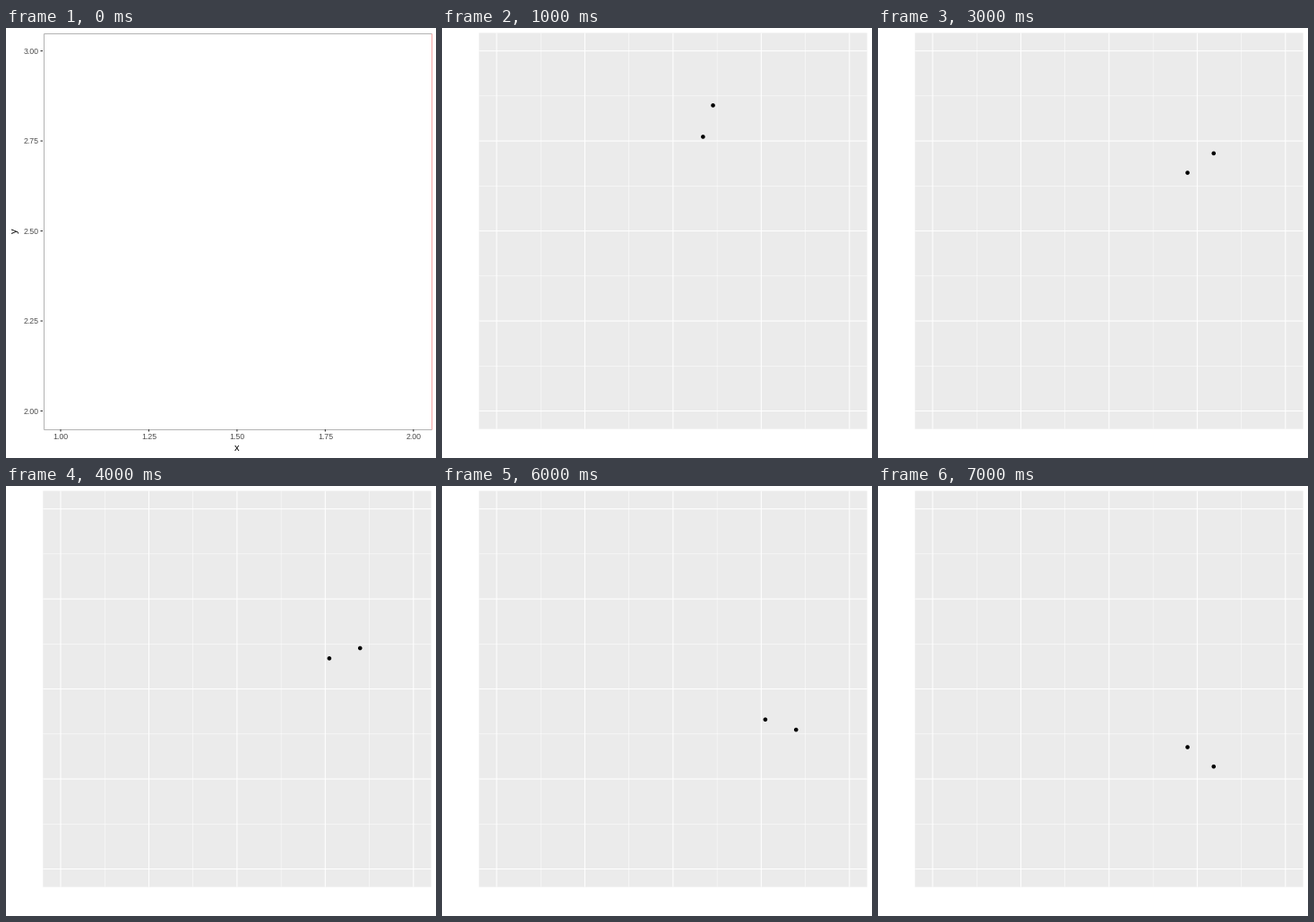
Animation, 480 px wide and 480 px high, one loop 8000 ms. Source, as a matplotlib script:

```python
import numpy as np
import matplotlib.pyplot as plt
from matplotlib.animation import FuncAnimation
from matplotlib.patches import Circle, Rectangle

SIZE, DPI = 480, 72          # at 72 dpi one point equals one pixel
FRAMES, INTERVAL = 8, 1000
LEFT, RIGHT, TOP, BOTTOM = 41.3, 474.5, 5.5, 447.6
CENTER = (1.5, 2.5)
RADII = (0.275, 0.3667)
STEP = np.pi / 10            # clockwise turn per frame
FONT = "Liberation Sans"

fig = plt.figure(figsize=(SIZE / DPI, SIZE / DPI), dpi=DPI, facecolor="white")
ax = fig.add_axes([0, 0, 1, 1])
ax.set_xlim(0, SIZE)
ax.set_ylim(SIZE, 0)
ax.axis("off")


def px(x):
    return LEFT + (x - 0.95) / 1.1 * (RIGHT - LEFT)


def py(y):
    return BOTTOM - (y - 1.95) / 1.1 * (BOTTOM - TOP)


def line(xs, ys, color, width, snap=False):
    art, = ax.plot(xs, ys, color=color, lw=width, snap=snap,
                   solid_capstyle="butt")
    return art


def label(x, y, text, size, color, ha="center", rotation=0):
    return ax.text(x, y, text, fontsize=size, color=color, family=FONT,
                   ha=ha, va="baseline", rotation=rotation,
                   rotation_mode="anchor")


def draw_axes():
    x0, x1, y0, y1 = 41.5, 474.5, 5.5, 447.5
    parts = [line([x0, x0], [y0, y1], "#b3b3b3", 1, True),
             line([x0, x1], [y0, y0], "#b3b3b3", 1, True),
             line([x0, x1], [y1, y1], "#b3b3b3", 1, True),
             line([x1, x1], [y0, y1], "#f5a3a3", 1, True)]
    for i in range(5):
        x, y = px(1 + i / 4), py(2 + i / 4)
        parts += [line([x, x], [448, 450.5], "#333333", 1.07),
                  line([38.5, 41], [y, y], "#333333", 1.07),
                  label(x, 459.3, f"{1 + i / 4:.2f}", 8.8, "#4d4d4d"),
                  label(36.2, y + 3.2, f"{2 + i / 4:.2f}", 8.8, "#4d4d4d",
                        ha="right")]
    parts += [label(257.9, 472, "x", 11, "black"),
              label(13, 226.5, "y", 11, "black", rotation=90)]
    return parts


def draw_panel():
    parts = [ax.add_patch(Rectangle((LEFT, TOP), RIGHT - LEFT, BOTTOM - TOP,
                                    fc="#ebebeb", ec="none", snap=False))]
    for i in range(9):
        width = 0.53 if i % 2 else 1.07
        x, y = px(1 + i / 8), py(2 + i / 8)
        parts += [line([x, x], [TOP, BOTTOM], "white", width),
                  line([LEFT, RIGHT], [y, y], "white", width)]
    return parts


axes_parts = draw_axes()
panel_parts = draw_panel()
dots = [ax.add_patch(Circle((0, 0), 2.3, fc="black", ec="none", zorder=5))
        for _ in RADII]


def update(frame):
    for part in axes_parts:
        part.set_visible(frame == 0)
    for part in panel_parts + dots:
        part.set_visible(frame > 0)
    angle = np.pi / 2 - STEP * frame
    for dot, r in zip(dots, RADII):
        dot.center = (px(CENTER[0] + r * np.cos(angle)),
                      py(CENTER[1] + r * np.sin(angle)))
    return axes_parts + panel_parts + dots


anim = FuncAnimation(fig, update, frames=FRAMES, interval=INTERVAL,
                     init_func=lambda: update(0), repeat=True,
                     repeat_delay=0, blit=False)
plt.show()
```
